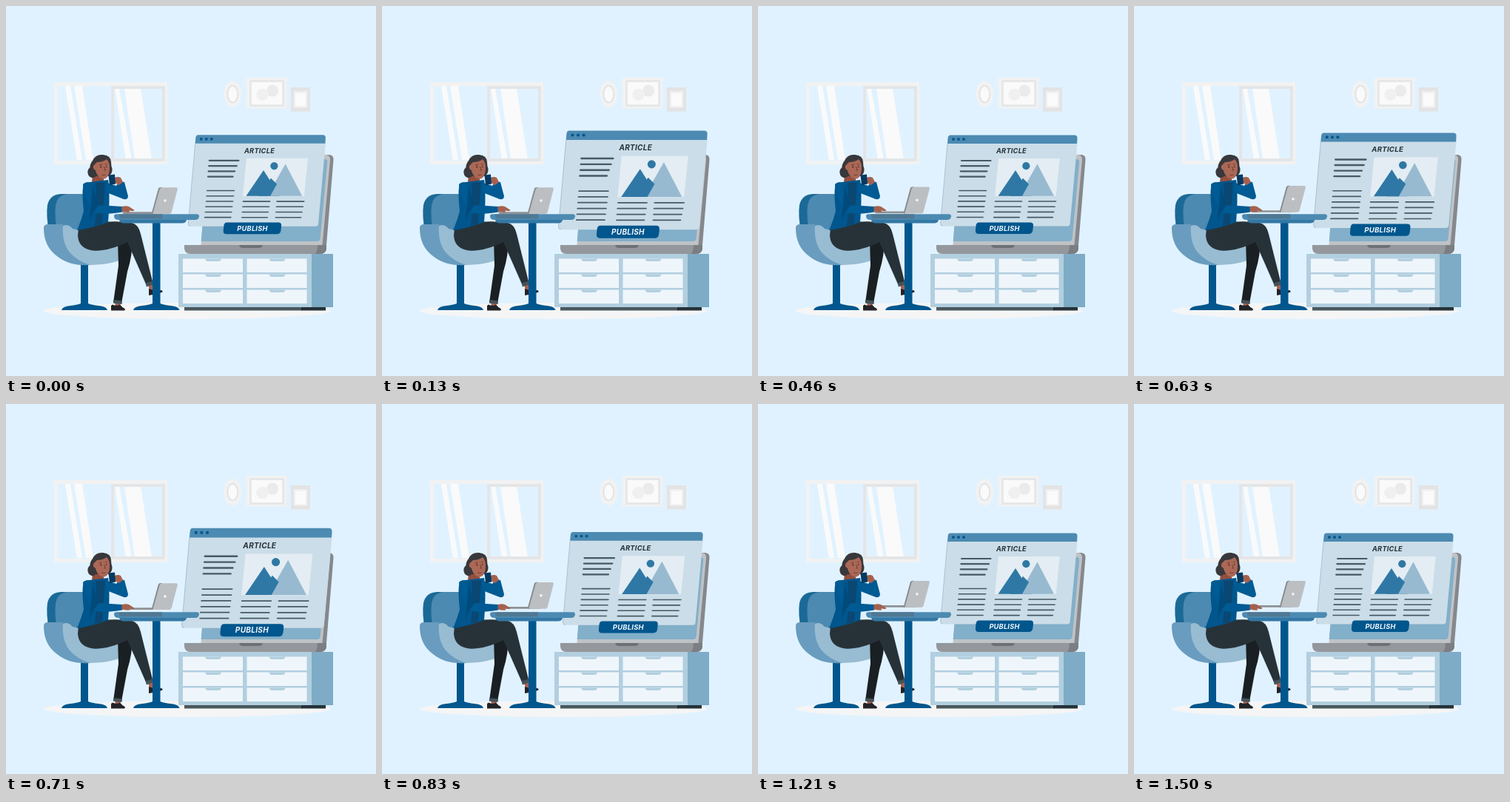
Write an HTML page that moves like this. It is 500x500 px and loops after 1540 ms.

```html
<!DOCTYPE html>
<html lang="en">
<head>
<meta charset="utf-8">
<title>Publishing an article</title>
<style>
  html, body { margin: 0; width: 100%; height: 100%; overflow: hidden; background: #e0f2ff; }
  svg { display: block; width: 100vw; height: 100vh; }
  text { font: italic 700 9.2px Inter, "Open Sans", sans-serif; letter-spacing: .25px; text-anchor: middle; }
  #panel { transform-origin: 339px 243px; }
</style>
</head>
<body>
<svg viewBox="0 0 500 500">
  <rect width="500" height="500" fill="#e0f2ff"/>
  <ellipse cx="245" cy="412" rx="194" ry="11" fill="#f5f5f5"/>

  <g id="window">
    <path d="M80 108h7l16 100h-7zM92 108h11l15 100h-10zM147 111h6l17 97h-8zM160 111h22l15 97h-23z" fill="#fafafa"/>
    <rect x="67.500" y="105.500" width="148" height="106" fill="none" stroke="#f2f2f2" stroke-width="5"/>
    <rect x="144" y="110" width="69" height="98" fill="none" stroke="#e4e5e6" stroke-width="4"/>
  </g>

  <g id="pictures">
    <ellipse cx="306.300" cy="119" rx="11.800" ry="18" fill="#f2f2f2"/>
    <ellipse cx="306.300" cy="119" rx="7" ry="11.300" fill="#fafafa" stroke="#e2e3e4" stroke-width="2"/>
    <rect x="325" y="97" width="54.500" height="41.500" fill="#f2f2f2"/>
    <rect x="330.500" y="101.500" width="44" height="33" fill="#fafafa" stroke="#e4e5e6" stroke-width="2.500"/>
    <circle cx="360" cy="114.500" r="8" fill="#ebebeb"/>
    <circle cx="346.500" cy="120" r="8.300" fill="#f0f0f0"/>
    <rect x="385" y="110" width="26" height="32.500" fill="#e3e3e3"/>
    <rect x="389" y="115" width="18" height="22.500" fill="#f0f0f0"/>
    <rect x="391" y="117.500" width="14" height="18" fill="#fafafa"/>
  </g>

  <g id="cabinet">
    <path d="M241 406h159v5.500h-159z" fill="#49585f"/>
    <path d="M399 406h33v5.500h-33z" fill="#263238"/>
    <path d="M233 335h181v72h-181z" fill="#b2cfdf"/>
    <path d="M413 335h29v72h-29z" fill="#7eabc5"/>
    <g id="drawers"></g>
  </g>

  <g id="monitor">
    <path d="M276 201h160q7 0 6.500 7l-9.500 115h-20z" fill="#85888c"/>
    <path d="M273 201h158q7.500 0 7 7l-10.500 115h-164z" fill="#c0c3c6"/>
    <path d="M273 207h158q3.500 0 3.200 4l-9.500 103q-.5 4-4 4h-157z" fill="#82afc9"/>
    <path d="M241 323h192v5q-1 7-8 7h-176q-7 0-8-7z" fill="#94979b"/>
    <path d="M421 323h12v5q-1 7-8 7h-7q3-5 3-12z" fill="#7b7e82"/>
    <path d="M315 323h32q-1 4-5 4h-22q-4 0-5-4z" fill="#6d7175"/>
  </g>

  <g id="panel">
    <path d="M256 185.500h175.500l-9.800 108.500q-.4 3.500-4 3.500h-168q-3.400 0-3.200-3.500z" fill="#cbdde8"/>
    <path d="M256 186l-9.400 108q-.2 3 3.200 3" fill="none" stroke="#8eabbc" stroke-width=".6"/>
    <path d="M260 174.500h167.500q4.200 0 4 4l-.4 7.500h-175.100l.6-7.500q.4-4 3.400-4z" fill="#4c8ab2"/>
    <g fill="#00568d">
      <circle cx="264" cy="180" r="1.900"/>
      <circle cx="271" cy="180" r="1.900"/>
      <circle cx="278" cy="180" r="1.900"/>
    </g>
    <text x="342.500" y="199" fill="#263238">ARTICLE</text>
    <path d="M325 206h82.700l-5 51h-82.700z" fill="#e3edf3"/>
    <circle cx="362.300" cy="216.200" r="5.100" fill="#2f78a5"/>
    <path d="M324.500 256.700l23.500-34.700 22 34.700z" fill="#2f78a5"/>
    <path d="M353 256.700l24.500-43.200 22.500 43.200z" fill="#98bad0"/>
    <path d="M341 256.700l17-24 8 8-9 16z" fill="#2f78a5"/>
    <g id="lines" stroke="#455a64" stroke-linecap="round"></g>
    <path d="M298.500 292.400h69.500q4.500 0 4 4.500l-.7 6.300q-.7 4.800-5.300 4.800h-68q-4.500 0-4.100-4.700l.6-6.300q.5-4.600 4-4.600z" fill="#00568d"/>
    <text x="333" y="303.600" fill="#eef6fb">PUBLISH</text>
  </g>

  <g id="chair">
    <path d="M101 345h10v57q5 2 14 3 11 1 12 6h-62q1-5 12-6 9-1 14-3z" fill="#00568d"/>
    <path d="M58 306q-4-24-2-37 3-14 18-15h26v50z" fill="#1b6996"/>
    <path d="M70 310q-5-25-3-40 2-15 17-16h28v56z" fill="#4c8ab2"/>
    <path d="M75 298q8-5 15 3l77 16q2 20-17 28-23 7-53 4-25-7-30-34z" fill="#98bcd2"/>
    <path d="M51 300q0-5 6-5h20q-2 26 10 39 10 11 27 16-28 2-45-12-18-13-18-38z" fill="#699cbe"/>
  </g>

  <g id="legs">
    <path d="M147 398h8l-1 10h-6z" fill="#a4614f"/>
    <path d="M142 405l2-1.500q4 2 8 1l2-1q3 4 6.500 5.500 1 2.500-1 2.500h-17.500z" fill="#232327"/>
    <path d="M151 316l20-3q0 24-7 46l-8 43-11-1 7-50z" fill="#191f22"/>
    <path d="M192 374h7v12h-5z" fill="#a4614f"/>
    <path d="M193 382l6 2q4 2 10 0 3 0 2.500 2.500-6 2.500-18.500 4.500z" fill="#232327"/>
    <path d="M98 301l33-9q21-2 39 1 9 2 12 15l16.500 66-8.500 4-26-59q-18 9-34 11-12 2-19-1-13-4-14-19z" fill="#273238"/>
    <path d="M188.500 374.500l10-3 1.200 4.500-9.700 3.500zM145 397l12 1.500-.6 4.500-11.500-1.500z" fill="#45525a"/>
  </g>

  <g id="body">
    <path d="M117 226h15v16l-8 4-8-5z" fill="#914f40"/>
    <path d="M113 238l25-3q3 20 0 57-24 9-42 11 7-17 9-26-3-26 0-37 3-2 8-2z" fill="#00568d"/>
    <path d="M121 239l13-1q-2 26-4 56l-10 3q4-32 1-58z" fill="#0a4773"/>
    <path d="M104 241q6-6 12 1l9 27 32 2q2 4 0 7.500-25 4-37 1-9-4-16-38z" fill="#005a93"/>
    <path d="M117 244l9 25q-7 5-13 21 2-20 4-46z" fill="#004a7c"/>
    <path d="M134 238l15 5 5-6 6 1 5 19q0 5-6 4l-23-9z" fill="#005a93"/>
    <path d="M147 232q4-2 8 0l3 6-5 4-6-3z" fill="#a4614f"/>
    <path d="M117 209q4-9 14-8 11 1 11 10 0 5 1.500 9 .5 7-5 10h-17q-6 5-10-1-3-7 2-11 0-5 3.500-9z" fill="#38383c"/>
    <path d="M123 211q8 0 13-4 4 4 4 11 0 10-4 14-4 3-9 0-5-4-6-10-4-2-3-6 2-2 5-5z" fill="#ab6856"/>
    <path d="M126 215l4-1m4-.2 3 .2M132.500 217l2 5-2 .3m-3 5.700q3 1.500 5-.3" fill="none" stroke="#5b302b" stroke-width=".8"/>
    <circle cx="128.300" cy="217.500" r=".9" fill="#26201f"/>
    <circle cx="135.700" cy="217.300" r=".8" fill="#26201f"/>
    <path d="M138.500 228.500l8.500-1 1 13-8 1.500z" fill="#053a61"/>
  </g>

  <g id="table">
    <path d="M198 290h10.500v112q5 2 14 3 11 1 12 6h-62.500q1-5 12-6 9-1 14-3z" fill="#00568d"/>
    <path d="M153 287h91v2q-1 4.500-6 4.500h-78q-6 0-7-4.500z" fill="#3478a5"/>
    <path d="M149 281.200h109q3 0 3 3.300-1 4.500-5 4.500h-104q-6 0-6-5 0-2.800 3-2.800z" fill="#4c8ab2"/>
    <path d="M153 281.200h58v6h-56q-2-2-2-6z" fill="#507893"/>
  </g>

  <g id="laptop">
    <path d="M157 278.300h57v2.700h-55q-2-.5-2-2.700z" fill="#8e9194"/>
    <path d="M205.500 248q.7-3 3.500-3h2l-9 36h-5.500z" fill="#85898c"/>
    <path d="M207.500 248q.8-2.800 3.500-2.800h19q2.300 0 1.800 2.500l-8 30.500q-.7 2.800-3.500 2.800h-22z" fill="#bcbfc2"/>
    <circle cx="215" cy="263" r="1.800" fill="#f3f5f6"/>
  </g>
  <path d="M156.500 271q6-1.500 10 .2l6.500 4.300q1 1.800-2 1.500l-5-.5 1.500 2q-6 .5-11-1z" fill="#a4614f"/>
</svg>
<script>
  const LOOP = 1540;
  const byId = id => document.getElementById(id);
  const clamp = v => Math.min(1, Math.max(0, v));

  function add(parent, tag, attrs) {
    const el = document.createElementNS("http://www.w3.org/2000/svg", tag);
    for (const key in attrs) el.setAttribute(key, attrs[key]);
    byId(parent).append(el);
  }

  for (let i = 0; i < 6; i++) {
    const x = 239 + 86.500 * (i % 2);
    const y = 341.500 + 21 * Math.floor(i / 2);
    add("drawers", "rect", { x, y, width: 81, height: 18.500, fill: "#eff6fb" });
    add("drawers", "path", { d: `M${x + 30} ${y}h22q-1 3.500-4 3.500h-14q-3 0-4-3.500z`, fill: "#b2cfdf" });
  }

  // Lines of text that lean with the page and get shorter by `taper`.
  function paragraph(x, y, count, length, taper, width) {
    for (let i = 0; i < count; i++) {
      const x1 = x - .6 * i, x2 = x1 + length - taper * i, lineY = y + 7.200 * i;
      add("lines", "line", { x1, x2, y1: lineY, y2: lineY, "stroke-width": width });
    }
  }
  paragraph(275, 209, 4, 39.500, 2, 2.200);
  paragraph(272, 249.500, 6, 36.500, .3, 1.600);
  paragraph(320.500, 264, 4, 36, .5, 1.600);
  paragraph(366, 264, 4, 36.500, .8, 1.600);

  // Straight rise to 1 at `peak`, straight fall back to 0.
  const beat = (t, peak, rise, fall) =>
    clamp(1 - (t < peak ? (peak - t) / rise : (t - peak) / fall));
  const smooth = u => u * u * (3 - 2 * u);

  function draw(now) {
    const t = now % LOOP;
    const scale = 1 + .1 * (beat(t, 150, 155, 280) + beat(t, 715, 150, 150));
    const lift = 6.200 * smooth(clamp((t - 280) / 880));
    byId("panel").style.transform = `scale(${scale})`;
    byId("laptop").style.transform = `translateY(${-lift}px)`;
  }

  const start = performance.now();
  function tick() {
    draw(performance.now() - start);
    requestAnimationFrame(tick);
  }
  tick();
</script>
</body>
</html>
```
